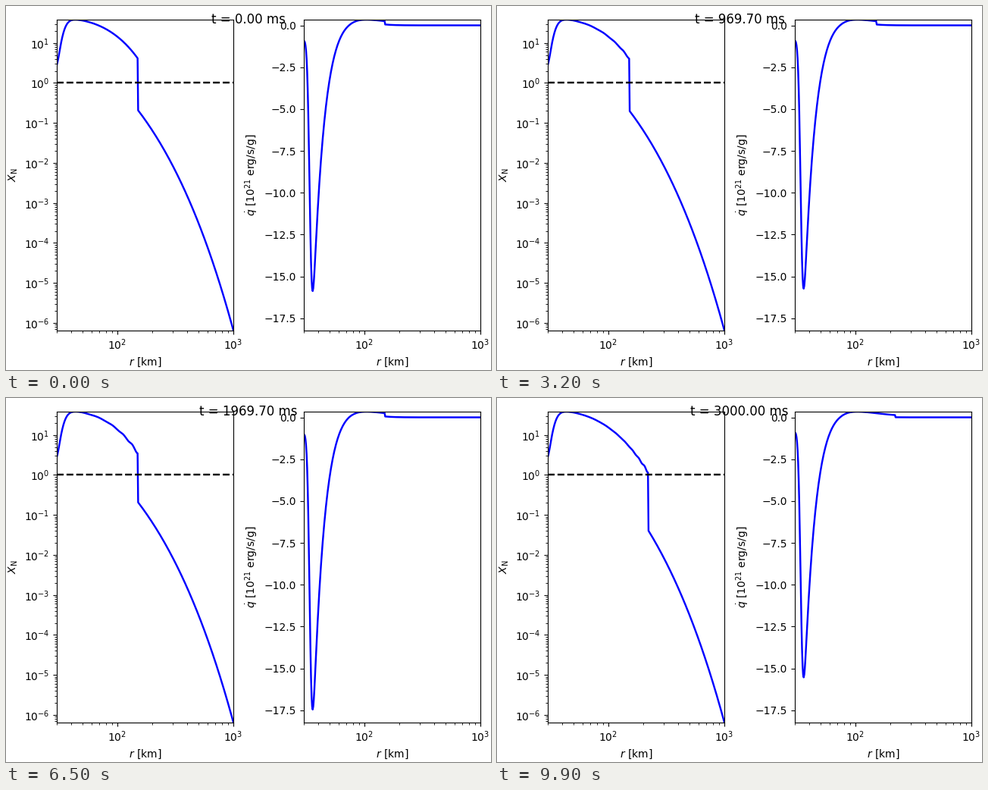
Recreate the animation shown at these times as a matplotlib script. Size 640 px wide and 480 px high, loop 10000 ms.

```python
import numpy as np
import matplotlib.pyplot as plt
from matplotlib.animation import FuncAnimation

W, H, DPI = 640, 480, 100
FRAMES, INTERVAL = 100, 100
T_END = 3000.0
R_MIN, R_MAX = 30.0, 1000.0
PANEL_W, PANEL_H = 233, 410
LW = 1.75

r = np.geomspace(R_MIN, R_MAX, 320)
L = np.log10(r)
DEPTH = L - L[0]
PX = np.log10(R_MAX / R_MIN) / PANEL_W      # decades of radius per pixel

# Key points of the slow drift; a regular pulse is added between them
KEYS = [0, 21, 43, 54, 76, 89, 99]
SHOCK = [106.7, 103.3, 111.5, 105.2, 109.3, 122.7, 132.6]
COOLING = [-15.87, -16.08, -15.37, -17.44, -17.46, -17.55, -15.53]


def edge(height, width, power):
    """Steep fall-off towards the inner boundary."""
    return height * np.exp(-(DEPTH / (width * PX)) ** power)


# Free infall outside the shock, settled matter inside it
INFALL = 1.876 + 0.5625 * L - 0.3082 * np.sqrt(r)
SETTLED = 0.3946 + 1.125 * L - 0.01488 * r - edge(1.155, 7.8, 1.4)

# Heating ~ r^-2 against cooling ~ r^-4, balanced where s = 1
s = R_MIN * 10 ** (59.7 * PX) / r
BALANCE = 1.36 * (s ** 2 - s ** 4) * np.exp(-edge(3.71, 6.4, 2.1))


def state(i):
    """Shock position in pixels and the deepest cooling rate."""
    pulse = np.sin(2 * np.pi * np.interp(i, KEYS, range(len(KEYS)))) ** 2
    shock = np.interp(i, KEYS, SHOCK) + 8 * pulse
    cooling = np.interp(i, KEYS, COOLING) - 0.6 * pulse
    return shock, cooling


def nucleons(i, shock, cooling):
    rs = R_MIN * 10 ** (shock * PX)
    lift = 0.12 * (cooling - COOLING[0]) + 0.01 * (shock - SHOCK[0])
    behind = np.minimum(r - rs, 0)
    ripple = 0.03 * min(1, (i / 45) ** 2)
    wave = ripple * np.exp(behind / 40) * np.sin(2 * np.pi * behind / 22)
    inner = SETTLED + lift * (np.maximum(r - 45, 0) / 172) ** 2 + wave
    return 10 ** np.where(r < rs, inner, INFALL)


def net_heating(x, cooling):
    scale = cooling / BALANCE.min()
    q = np.where(BALANCE < 0, BALANCE * scale, BALANCE)
    return q * np.minimum(x, 1)


def panel(left, ylabel):
    ax = fig.add_axes([left / W, 52 / H, PANEL_W / W, PANEL_H / H])
    ax.set_xscale("log")
    ax.set_xlim(R_MIN, R_MAX)
    ax.set_xlabel(r"$r$ [km]")
    ax.set_ylabel(ylabel)
    line, = ax.plot([], [], color="b", lw=LW)
    return ax, line


fig = plt.figure(figsize=(W / DPI, H / DPI), dpi=DPI)
title = fig.suptitle("", y=0.982)

ax_x, line_x = panel(67, r"$X_\mathrm{N}$")
ax_x.set_yscale("log")
ax_x.set_ylim(10 ** -6.19, 10 ** 1.583)
ax_x.plot(r, np.ones_like(r), "k--", lw=LW)

ax_q, line_q = panel(393, r"$\dot{q}$ [$10^{21}$ erg/s/g]")
ax_q.set_ylim(-18.23, 0.34)


def update(i):
    shock, cooling = state(i)
    x = nucleons(i, shock, cooling)
    line_x.set_data(r, x)
    line_q.set_data(r, net_heating(x, cooling))
    title.set_text(f"t = {T_END * i / (FRAMES - 1):.2f} ms")
    return line_x, line_q, title


anim = FuncAnimation(fig, update, frames=FRAMES, interval=INTERVAL,
                     repeat=True, repeat_delay=0, blit=False)
plt.show()
```
